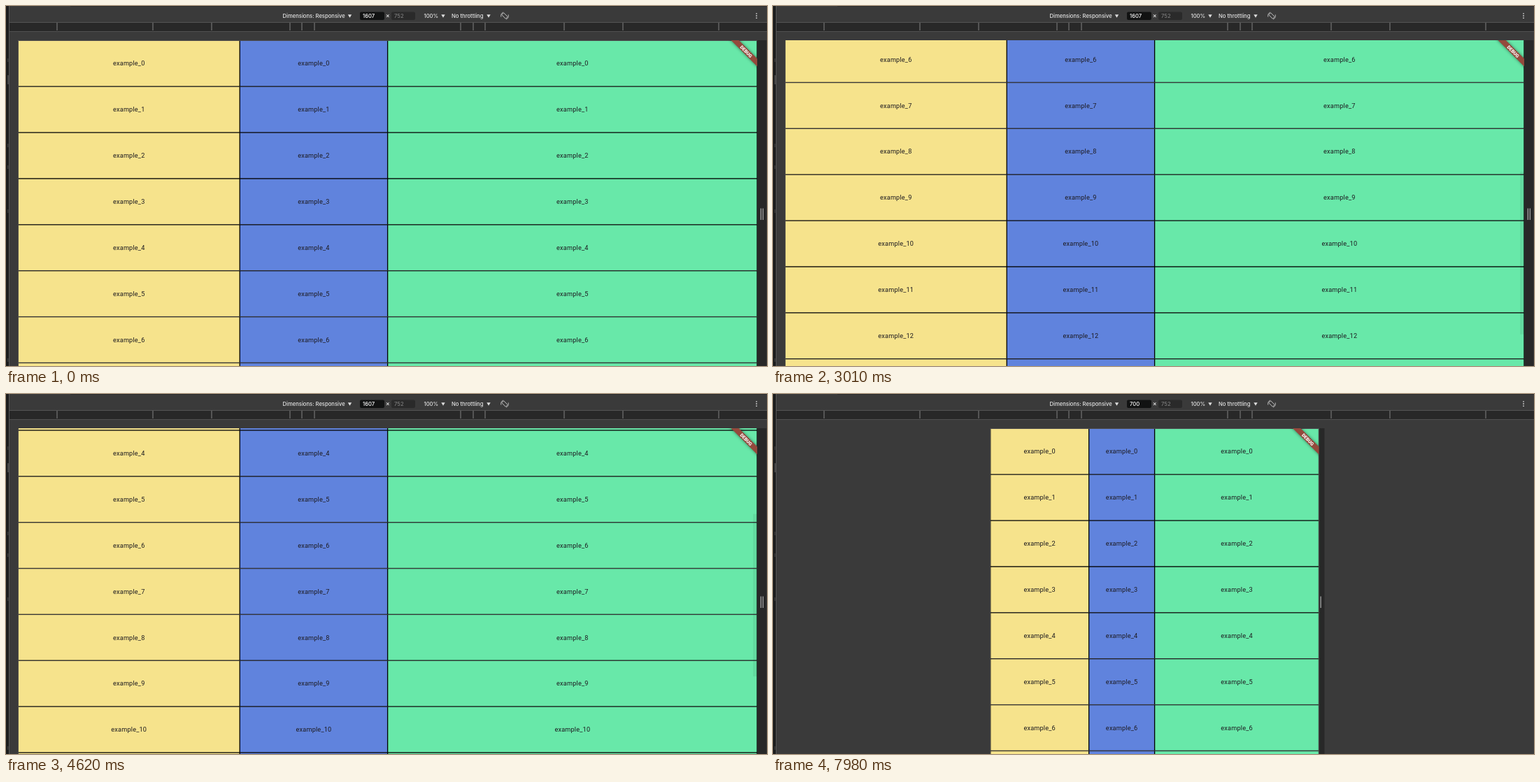
Animation of 1088x515 px, one loop 8 s. Source, as an HTML page with a canvas:

```html
<!DOCTYPE html>
<html>
<head>
<meta charset="utf-8">
<style>
  html, body { margin: 0; width: 100%; height: 100%; overflow: hidden; background: #3a3a3a; }
  canvas { display: block; }
</style>
</head>
<body>
<canvas id="stage" width="1088" height="515"></canvas>
<script>
const ctx = document.getElementById('stage').getContext('2d');
const LOOP = 8000, STEP = 70;
const TOP = 49.3, PITCH = 65.88, ROWS = 16, VIEW = 495, CENTER = 545.6;
const UI = 'Inter, sans-serif', APP = 'Roboto, sans-serif';
const COLUMNS = [[0, .3, '#f6e38c'], [.3, .2, '#6083dd'], [.5, .5, '#68e8a9']];

// [time, value] keys
const SCROLL = [[1330, 0], [1610, 296], [1890, 400], [2170, 421], [3010, 401], [3430, 195],
  [3850, 8], [3990, -16], [4130, -13], [4410, 175], [4690, 274], [4970, 289]];
const LEFT = [[6230, 17.2], [6650, 54], [7070, 115], [7140, 127.2], [7560, 229], [7910, 302], [7980, 310.7], [8050, 319]];

// Smooth curve through the keys, flat at turning points
function follow(keys, t) {
  const last = keys.length - 1;
  if (t <= keys[0][0]) return keys[0][1];
  if (t >= keys[last][0]) return keys[last][1];
  const i = keys.findIndex(k => k[0] > t) - 1;
  const slope = n => (keys[n + 1][1] - keys[n][1]) / (keys[n + 1][0] - keys[n][0]);
  const tangent = n => {
    if (n === 0 || n === last) return 0;
    const a = slope(n - 1), b = slope(n);
    return a * b <= 0 ? 0 : 2 * a * b / (a + b);
  };
  const [t0, a] = keys[i], [t1, b] = keys[i + 1];
  const d = t1 - t0, u = (t - t0) / d, v = 1 - u;
  return a * v * v * (1 + 2 * u) + b * u * u * (3 - 2 * u) + d * u * v * (tangent(i) * v - tangent(i + 1) * u);
}

function rect(x, y, w, h, color) {
  ctx.fillStyle = color;
  ctx.fillRect(x, y, w, h);
}

function text(str, x, y, font, color, align = 'left', spacing = 0) {
  ctx.font = font;
  ctx.letterSpacing = spacing + 'px';
  ctx.textAlign = align;
  ctx.fillStyle = color;
  ctx.fillText(str, x, y);
}

function field(x, w, value, color, back) {
  ctx.fillStyle = back;
  ctx.beginPath();
  ctx.roundRect(x, 8.5, w, 11.5, 2);
  ctx.fill();
  text(value, x + 4, 17, '500 7.65px ' + UI, color);
}

function caret(x) {
  ctx.fillStyle = '#dedede';
  ctx.beginPath();
  ctx.moveTo(x - 2.7, 12.3);
  ctx.lineTo(x + 2.7, 12.3);
  ctx.lineTo(x, 16.7);
  ctx.fill();
}

function rotateIcon() {
  ctx.save();
  ctx.translate(713, 14);
  ctx.strokeStyle = '#c8c8c8';
  ctx.lineWidth = .9;
  for (const a of [-2.7, .45]) {
    ctx.beginPath();
    ctx.arc(0, 0, 5.4, a + 2.4, a + 3.9);
    ctx.stroke();
  }
  ctx.rotate(-Math.PI / 4);
  ctx.strokeRect(-2, -4, 4, 8);
  ctx.restore();
}

function toolbar(width) {
  const font = '500 7.65px ' + UI, ink = '#e4e4e4';
  rect(0, 0, 1088, 515, '#3a3a3a');
  rect(92, 0, 996, 1, '#2c2c2c');
  rect(0, 23, 1088, 13, '#282828');
  rect(0, 23, 1088, 1, '#545454');
  rect(0, 36, 1088, 1, '#505050');
  for (const x of [73, 210, 294, 406, 423, 441, 650, 668, 685, 798, 882, 1019])
    rect(x - .5, 24, 1, 11, '#828282');

  rect(0, 0, 4, 515, '#1b1c1c');
  rect(4, 0, 1, 515, '#555');
  rect(2, 99, 2, 13, '#444');
  for (const y of [75, 197, 228, 291, 504]) rect(2, y, 1.5, 5, '#393939');

  text('Dimensions: Responsive', 395.5, 17, font, ink);
  caret(491.5);
  field(506, 35, width, '#fff', '#111212');
  text('×', 545.7, 17, '500 9px ' + UI, ink, 'center');
  field(551, 34, '752', '#7c7c7c', '#2a2a2a');
  text('100%', 597.5, 17, font, ink);
  caret(625);
  text('No throttling', 637, 17, font, ink);
  caret(690);
  rotateIcon();
  for (const y of [10.8, 14, 17.2]) {
    ctx.fillStyle = '#d0d0d0';
    ctx.beginPath();
    ctx.arc(1073, y, .9, 0, 7);
    ctx.fill();
  }
}

function ribbon(right) {
  ctx.save();
  ctx.translate(right - 15.8, TOP + 15.8);
  ctx.rotate(Math.PI / 4);
  ctx.shadowColor = 'rgba(0,0,0,.5)';
  ctx.shadowBlur = 4;
  rect(-30, -4, 60, 7.9, '#94493c');
  ctx.shadowBlur = 0;
  ctx.shadowColor = 'transparent';
  text('DEBUG', 0, 2.4, '900 6.7px ' + APP, '#fff', 'center');
  ctx.restore();
}

function resizer(right, t) {
  const dragging = t >= 6300;
  const shade = t < 5390 ? '#282828' : t < 5460 ? '#313131' : dragging ? '#282828' : '#3a3a3a';
  rect(right, 49, dragging ? 8 : 13.3, 466, shade);
  for (const x of dragging ? [2] : [4.7, 7.7]) rect(right + x, 289.5, 1.2, 16.5, '#b0b0b0');
}

function table(left, right, scroll, showThumb) {
  const w = right - left, edge = .66;
  ctx.save();
  ctx.beginPath();
  ctx.rect(left, 49, w, 466);
  ctx.clip();
  rect(left, 49, w, 466, '#fdf7ff');
  for (let row = 0; row < ROWS; row++) {
    const y = TOP + row * PITCH - scroll;
    if (y > 515 || y + PITCH < 49) continue;
    rect(left, y, w, PITCH + .05, '#000');
    for (const [start, share, color] of COLUMNS) {
      const x = left + start * w, cw = share * w;
      rect(x + edge, y + edge, cw - 2 * edge, PITCH - 2 * edge, color);
      text('example_' + row, x + cw / 2, y + PITCH / 2 + 3.2, '9.2px ' + APP, '#1d1b20', 'center', .16);
    }
  }
  if (showThumb) {
    const ratio = VIEW / (ROWS * PITCH), over = Math.min(scroll, 0);
    rect(right - 6, 49 + Math.max(scroll, 0) * ratio, 5.5, VIEW * ratio + over * .4, 'rgba(0,0,0,.06)');
  }
  ribbon(right);
  ctx.restore();
}

function draw(now) {
  const t = Math.floor(now % LOOP / STEP) * STEP;
  const left = follow(LEFT, t), right = 2 * CENTER - left;
  const perPixel = left < 127.2 ? 3.2 : 3.0245;
  const width = Math.round(1255 - (left - 127.2) * perPixel);
  // The list is rebuilt from its top once the viewport gets narrow
  const scroll = width < 1000 ? 0 : follow(SCROLL, t);
  toolbar(width);
  resizer(right, t);
  table(left, right, scroll, t >= 1400 && t < 6300);
}

const begin = performance.now();
function tick() {
  draw(performance.now() - begin);
  requestAnimationFrame(tick);
}
tick();
</script>
</body>
</html>
```
